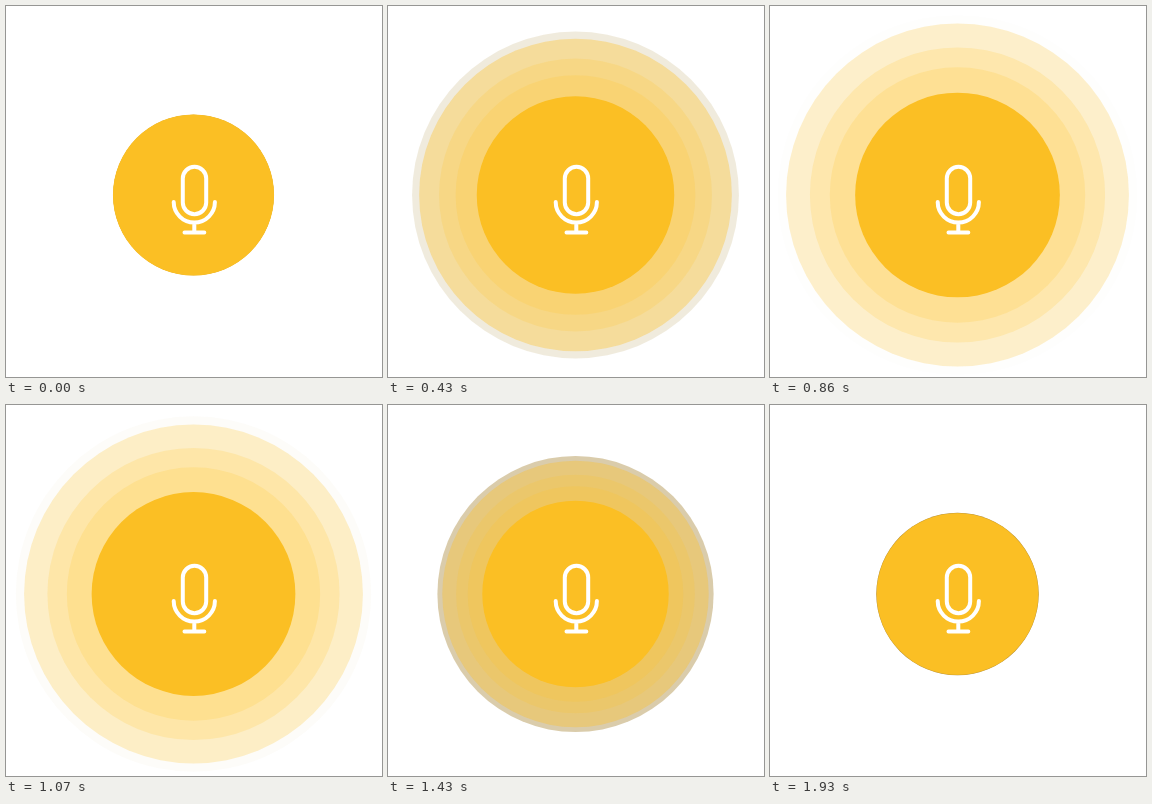
These frames come from a looping animation (376x371 px, 2000 ms). An HTML page without scripts:

```html
<!DOCTYPE html>
<html lang="en">
<head>
<meta charset="utf-8">
<title>Voice pulse</title>
<style>
  html, body { margin: 0; width: 100%; height: 100%; overflow: hidden; background: #fff; }
  svg { display: block; width: 376px; height: 371px; }

  .disc {
    --from: 80px;
    fill: #fbbf24;
    r: var(--from);
    animation: pulse 2s infinite;
  }
  .shade { --to: 180.5px; fill: #a8873a; animation-name: pulse, vanish; }
  .far   { --to: 172px; animation: pulse 2s infinite, thin 2s linear infinite; }
  .mid   { --to: 148px; fill-opacity: .18; }
  .near  { --to: 128px; fill-opacity: .18; }
  .core  { --from: 80.5px; --to: 102.5px; }

  /* quick swell, gentler return */
  @keyframes pulse {
    0%   { r: var(--from); animation-timing-function: cubic-bezier(.23, .6, .32, 1); }
    50%  { r: var(--to); animation-timing-function: cubic-bezier(.36, .09, .66, 1); }
    100% { r: var(--from); }
  }
  @keyframes vanish {
    0%   { fill-opacity: 1; animation-timing-function: cubic-bezier(.23, .6, .32, 1); }
    50%  { fill-opacity: 0; animation-timing-function: cubic-bezier(.36, .09, .66, 1); }
    100% { fill-opacity: 1; }
  }
  @keyframes thin {
    0%, 23% { fill-opacity: .36; }
    28.5%   { fill-opacity: .275; }
    40%, 53% { fill-opacity: .23; }
    60.5%   { fill-opacity: .35; }
    70%, 100% { fill-opacity: .36; }
  }

  .mic { fill: none; stroke: #fff; stroke-width: 4; stroke-linecap: round; }
</style>
</head>
<body>
<svg viewBox="0 0 376 371">
  <g transform="translate(187.5 189)">
    <circle class="disc shade"/>
    <circle class="disc far"/>
    <circle class="disc mid"/>
    <circle class="disc near"/>
    <circle class="disc core"/>
  </g>
  <g class="mic">
    <rect x="176.8" y="160.8" width="23.4" height="47.4" rx="11.7"/>
    <path d="M167.7 196a20.6 20.6 0 0 0 41.2 0M188.3 217v9.5M178.5 226.6h19.8"/>
  </g>
</svg>
</body>
</html>
```
